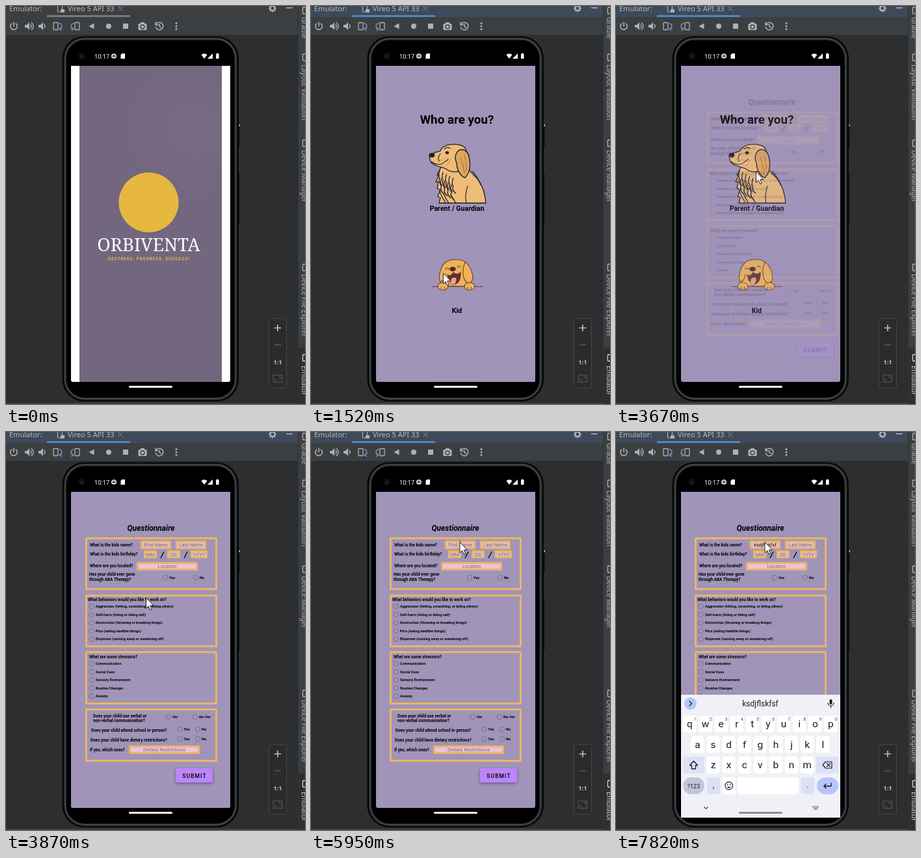
An HTML page with a canvas for the animation above (8000 ms loop, 460 by 612 pixels).

```html
<!DOCTYPE html>
<html lang="en">
<head>
<meta charset="utf-8">
<title>Emulator walkthrough</title>
<style>
html, body { margin: 0; width: 100%; height: 100%; overflow: hidden; background: #2b2d2f; }
canvas { display: block; width: 460px; height: 612px; }
</style>
</head>
<body>
<canvas id="stage" width="460" height="612"></canvas>
<script>
const W = 460, H = 612, LOOP = 8000;
const LILAC = '#a094b9', GOLD = '#ebb662', ICON = '#afb1b3', DIM = '#585b5d';
const ROBOTO = 'Roboto, sans-serif', NOTO = '"Noto Sans", sans-serif';
const TYPED = 'ksdjflskfsf';
const main = document.getElementById('stage').getContext('2d');
let c = main;

// Drawing helpers, all working on the current context
function text(s, x, y, font, color = '#000', align = 'left', spacing = 0) {
  c.font = font;
  c.fillStyle = color;
  c.textAlign = align;
  c.letterSpacing = spacing + 'px';
  c.fillText(s, x, y);
}
function rect(x, y, w, h, color) {
  c.fillStyle = color;
  c.fillRect(x, y, w, h);
}
function round(x, y, w, h, r, fill, stroke, lw = 1) {
  c.beginPath();
  c.roundRect(x, y, w, h, r);
  paint(fill, stroke, lw);
}
function paint(fill, stroke, lw = 1) {
  if (fill) { c.fillStyle = fill; c.fill(); }
  if (stroke) { c.strokeStyle = stroke; c.lineWidth = lw; c.stroke(); }
}
function disc(x, y, r, fill, stroke, lw = 1) {
  oval(x, y, r, r, fill, stroke, lw);
}
function oval(x, y, rx, ry, fill, stroke, lw = 1) {
  c.beginPath();
  c.ellipse(x, y, rx, ry, 0, 0, 7);
  paint(fill, stroke, lw);
}
function path(d, fill, stroke, lw = 1) {
  const p = new Path2D(d);
  if (fill) { c.fillStyle = fill; c.fill(p); }
  if (stroke) { c.strokeStyle = stroke; c.lineWidth = lw; c.stroke(p); }
}
function clipped(draw, h, r) {
  c.save();
  c.beginPath();
  c.roundRect(100, 92, 245, h, [0, 0, r, r]);
  c.clip();
  draw();
  c.restore();
}
function layer(draw) {
  const cv = document.createElement('canvas');
  cv.width = W;
  cv.height = H;
  c = cv.getContext('2d');
  c.lineJoin = c.lineCap = 'round';
  draw();
  c = main;
  return cv;
}

// App pages
function splash() {
  rect(0, 0, W, H, '#fff');
  rect(113, 92, 219, 486, '#72677f');
  const glow = c.createRadialGradient(290, 190, 10, 290, 190, 110);
  glow.addColorStop(0, 'rgba(130,116,142,.3)');
  glow.addColorStop(1, 'rgba(130,116,142,0)');
  rect(113, 92, 219, 300, glow);
  disc(219.5, 302, 46, '#e6b840');
  text('ORBIVENTA', 219.5, 377, '500 27.6px "Noto Serif", serif', '#fff', 'center');
  text('DESTRESS, PROGRESS, SUCCESS!', 220, 390.7, 'bold 5.8px Inter, sans-serif', '#edc04a', 'center', 1);
}

function bigDog() {
  const ink = '#1f1d2e', fur = '#edbd78';
  // Body with a ragged chest, then head, muzzle and ear
  path('M199 246L192 260L195 260L190 270L194 271L192 280L197 283L193 293L197 295L195 303H267C266 290 263 278 255 267C250 261 244 257 240 250Z', fur, ink, 1.3);
  path('M205 215C211 212 226 211 234 217C239 223 239 234 237 246C229 256 215 258 205 250C199 247 191 247 186 243C181 241 181 236 180 231C183 226 190 225 197 223C198 219 201 217 205 215Z', fur, ink, 1.3);
  path('M222 226C227 218 237 219 241 231C244 244 243 256 235 264C226 261 222 249 222 241C219 235 219 231 222 226Z', '#dfa55b', ink, 1.4);
  path('M183 239C189 244 199 246 204 239M203 220C206 217 209 217 212 219M197 227C194 231 193 235 195 239M204 239c3 0 4-2 5-4', null, ink, 1.1);
  oval(184, 229.5, 4.4, 3.4, ink);
  oval(207.5, 225.5, 2.8, 2.3, ink);
  for (let i = 0; i < 9; i++) {
    const x = 196 + i * 2.6, y = 253 + (i * 13) % 23;
    path(`M${x} ${y}q-3 8 0 12l-1 3q1 5 5 8`, null, ink, 1.3);
  }
  path('M196 284c2 7 5 13 9 18M202 288c2 6 5 11 8 15M213 290c3 5 5 9 8 13', null, ink, 1.2);
  path('M239 277c-3 9-4 18-2 26M246 254c5 5 10 12 13 21', null, ink, 1.1);
  path('M228 232c3 9 5 17 6 26M234 229c2 8 3 15 3 24', null, '#9c6a38', 0.9);
  path('M190 234c4 3 8 4 12 2M212 236c-1 5-3 8-7 10', null, '#bb8547', 0.9);
}

function smallDog() {
  const ink = '#6b3f33', fur = '#edb25a';
  path('M184 431.5H262', null, ink, 1);
  path('M198 431C195 420 197 402 204 395C211 389 226 388 234 393C241 398 244 410 243 431Z', fur, ink, 1.1);
  path('M203 396C198 401 194 414 196 422C199 426 204 421 205 413', fur, ink, 1.1);
  path('M235 394C243 398 249 415 246 422C242 429 236 426 233 418C231 410 231 403 235 394Z', fur, ink, 1.1);
  path('M208 413C211 416 215 414 217 409C220 413 225 413 228 409C229 418 226 427 219 428C212 427 209 421 208 413Z', '#5b2e2c', ink, 0.8);
  path('M214 419C218 416 222 417 222 421C221 426 219 430 215 429C212 428 212 422 214 419Z', '#e9a09c', ink, 0.7);
  oval(216, 404.5, 4.8, 3.4, '#4c2826');
  path('M205 405c1-3 4-3 5 0M223 402c1-3 4-3 5 0', null, ink, 1.1);
  for (const x of [201, 242]) {
    oval(x, 431, 8, 5.8, fur, ink, 1.1);
    path(`M${x - 2.5} 432v4M${x + 2.5} 432v4`, null, ink, 0.8);
  }
}

function chooser() {
  rect(0, 0, W, H, LILAC);
  text('Who are you?', 222.5, 181, 'bold 18.8px ' + ROBOTO, '#000', 'center');
  bigDog();
  text('Parent / Guardian', 222.5, 315, 'bold 10.6px ' + ROBOTO, '#000', 'center');
  smallDog();
  text('Kid', 222.5, 472, 'bold 10.6px ' + ROBOTO, '#000', 'center');
}

function label(s, x, mid) { text(s, x, mid + 2.3, 'bold 6.35px ' + ROBOTO); }
function radio(x, y, s, gap = 6) {
  disc(x, y, 3.7, null, '#756b8b', 0.9);
  text(s, x + gap, y + 2.1, 'bold 5.55px ' + ROBOTO);
}
function field(x, y, w, h, hint, fill = '#e2bfd0') {
  round(x, y, w, h, 0, GOLD);
  rect(x + 3, y + 3, w - 6, h - 6, fill);
  if (hint) text(hint, x + w / 2, y + h / 2 + 2.6, '7.5px ' + ROBOTO, '#766383', 'center');
}

function form() {
  rect(0, 0, W, H, LILAC);
  text('Questionnaire', 222, 152, 'italic bold 12px ' + ROBOTO, '#000', 'center');
  for (const [y, h] of [[162, 81], [250, 81], [337, 82], [425, 82]]) {
    c.strokeStyle = GOLD;
    c.lineWidth = 3;
    c.strokeRect(122.5, y + 1.5, 200, h - 3);
  }
  label('What is the kids name?', 128, 173.5);
  field(206, 167, 47, 13, 'First Name');
  field(260, 167, 47, 13, 'Last Name');
  label('What is the kids birthday?', 128, 188);
  field(211, 182, 20, 12, 'MM');
  field(247, 182, 20, 12, 'DD');
  field(283, 182, 26, 12, 'YYYY');
  for (const x of [239.5, 275.5]) text('/', x, 193, 'italic bold 13px ' + ROBOTO, '#000', 'center');
  label('Where are you located?', 128, 206);
  field(200, 200, 94, 13, 'Location', '#edc2dc');
  label('Has your child ever gone', 127, 218.5);
  label('through ABA Therapy?', 127, 226.5);
  radio(244, 224, 'Yes');
  radio(291, 224, 'No');

  label('What behaviors would you like to work on?', 125, 258);
  ['Aggression (hitting, scratching, or biting others)', 'Self-harm (hiting or biting self)',
    'Destruction (throwing or breaking things)', 'Pica (eating inedible things)',
    'Elopment (running away or wandering off)'
  ].forEach((s, i) => radio(130.5, 268.3 + i * 12.5, s, 6.5));

  label('What are some stressors?', 127, 345.5);
  ['Communication', 'Social Cues', 'Sensory Environment', 'Routine Changes', 'Anxiety']
    .forEach((s, i) => radio(130.5, 356 + i * 12.5, s, 6.5));

  label('Does your child use verbal or', 133, 436.7);
  label('non-verbal communication?', 133, 444);
  radio(249, 438, 'Ver');
  radio(290, 438, 'No-Ver');
  label('Does your child attend school in-person?', 130, 459);
  label('Does your child have dietary restrictions?', 129, 474);
  for (const y of [457, 472]) {
    radio(266.5, y, 'Yes');
    radio(294, y, 'No');
  }
  label('If yes, which ones?', 128, 489);
  field(188, 482, 109, 13, 'Dietary Restrictions', '#edc2dc');

  c.shadowColor = 'rgba(0,0,0,.4)';
  c.shadowBlur = 4;
  c.shadowOffsetY = 1.5;
  round(260, 517, 57, 22, 2, '#bb86fc');
  c.shadowColor = 'transparent';
  text('SUBMIT', 289, 531.5, '500 8.6px ' + ROBOTO, '#000', 'center', 1);
}

function keyboard() {
  const soft = '#dde1f7', blue = '#b4c6fc', ink = '#1c1b20';
  const key = (s, x, y) => {
    round(x - 10.2, y - 13, 20.4, 26, 3.5, '#fff');
    text(s, x, y + 5, '15.5px ' + ROBOTO, ink, 'center');
  };
  rect(100, 404, 245, 189, '#f1f0f7');
  disc(114.5, 417.5, 9.5, blue);
  path('M113 414l3.5 3.5l-3.5 3.5', null, ink, 1.3);
  round(328.5, 411, 4, 8, 2, ink);
  path('M326 416.5a4.5 4.5 0 0 0 9 0M330.5 421v3', null, ink, 1.2);
  [...'qwertyuiop'].forEach((s, i) => {
    key(s, 113.5 + i * 24.1, 449);
    text((i + 1) % 10, 121.5 + i * 24.1, 443.5, '6.5px ' + ROBOTO, '#47464f', 'center');
  });
  [...'asdfghjkl'].forEach((s, i) => key(s, 125.5 + i * 24.1, 480.5));
  [...'zxcvbnm'].forEach((s, i) => key(s, 149.5 + i * 24.1, 512));
  round(103, 499, 33, 26, 3.5, soft);
  path('M119.5 506l6 6.5h-3v5.5h-6v-5.5h-3z', null, ink, 1.3);
  round(308, 499, 34, 26, 3.5, soft);
  path('M318 512l4.5-5h9.5v10h-9.5zM324.5 509.5l5 5M329.5 509.5l-5 5', null, ink, 1.2);

  round(103, 531, 33, 26, 13, '#c2c5dc');
  text('?123', 119.5, 547.5, '9px ' + ROBOTO, ink, 'center');
  round(139.5, 531, 20.5, 26, 3.5, soft);
  text(',', 150, 547, '13px ' + ROBOTO, ink, 'center');
  round(163.5, 531, 20.5, 26, 3.5, '#fff');
  disc(173.7, 544, 5.8, null, ink, 1.2);
  disc(171.7, 542.3, 0.9, ink);
  disc(175.7, 542.3, 0.9, ink);
  path('M170.8 545.6a3.2 3.2 0 0 0 5.8 0z', ink);
  round(187, 531, 94, 26, 3.5, '#fff');
  round(284.5, 531, 20.5, 26, 3.5, soft);
  text('.', 295, 547, '13px ' + ROBOTO, ink, 'center');
  round(309, 531, 33, 26, 13, blue);
  path('M331 540v4.5h-11M323 541.3l-3.2 3.2l3.2 3.2', null, ink, 1.3);
  path('M135.5 576.5l3 3l3-3', null, '#4a4952', 1.1);
  for (let i = 0; i < 10; i++) rect(302.5 + (i % 5) * 2, 575 + (i > 4) * 2, 1.2, 1.2, '#4a4952');
  rect(304.5, 579.2, 5.2, 1.2, '#4a4952');
}

// IDE window and phone body
function sideTab(s, y, iconY, color = '#b4b6b8') {
  round(456.5, iconY - 5, 8, 10, 1, null, color, 1.3);
  c.save();
  c.translate(454.5, y);
  c.rotate(Math.PI / 2);
  text(s, 0, 0, '10.6px ' + NOTO, color);
  c.restore();
}

function toolbar() {
  const y = 31, blue = '#6f93c8';
  path('M12 25v6M8.6 27.2a5.2 5.2 0 1 0 6.8 0', null, ICON, 1.6);
  for (const x of [35, 56]) {
    path(`M${x - 6} 29h3l4-4v12l-4-4h-3z`, ICON);
    path(`M${x + 3} 28.5a3.5 3.5 0 0 1 0 5`, null, ICON, 1.4);
  }
  path('M39 25.5a6.5 6.5 0 0 1 0 11', null, ICON, 1.3);
  round(73, 25.5, 7, 11, 1, null, ICON, 1.3);
  path('M82 26.5c5 1 5 8 1 9M85 33l-3 2.5l3 2', null, blue, 1.4);
  round(106, 25.5, 7, 11, 1, null, ICON, 1.3);
  path('M104 26.5c-5 1-5 8-1 9M101 33l3 2.5l-3 2', null, blue, 1.4);
  path('M127.5 31l8-4.5v9z', ICON);
  disc(158, y, 4, ICON);
  rect(180, 27, 8, 8, ICON);
  round(203.5, 27, 13, 10, 1.5, ICON);
  rect(207, 25, 6, 3, ICON);
  disc(210, 32, 3, null, '#3c3f41', 1.3);
  path('M231 28a5.8 5.8 0 1 1-.6 4.5M230 25v4h4M236 28v3.5l2.5 1.5', null, ICON, 1.5);
  for (const d of [-4.5, 0, 4.5]) disc(262, y + d, 1.5, ICON);
}

function zoomPanel() {
  round(404.5, 480.5, 27, 107, 3, '#292b2c', '#434547');
  path('M413.5 495h9M418 490.5v9', null, '#bcbec0', 1.7);
  path('M413.5 521h9', null, DIM, 1.5);
  text('1:1', 418, 550.5, 'bold 9.6px ' + NOTO, '#bcbec0', 'center');
  c.strokeStyle = DIM;
  c.lineWidth = 1;
  c.strokeRect(411.5, 567.5, 13, 11);
  path('M414 573.5v2.5h2.5M419.5 570h2.5v2.5', null, DIM, 1);
}

function phone() {
  rect(357, 182, 3, 35, '#161718');
  rect(358.5, 182, 1.5, 3, '#c0c0c0');
  rect(357, 258, 2.5, 78, '#161718');
  // Dark shell, soft metal rim, black glass
  round(86.5, 46.5, 271.5, 561.5, 34, '#050506');
  round(91, 50.5, 262.5, 553.5, 30, '#000', '#1d1e1f', 4.5);
  round(91, 50.5, 262.5, 553.5, 30, null, '#46484a', 1.8);
  disc(116.5, 77, 5.5, '#0d0e10');
  disc(116.5, 77, 1.6, '#2b3140');
  text('10:17', 136, 80.5, '9.3px ' + ROBOTO, '#fff');
  disc(166, 77, 3.2, null, '#fff', 1.2);
  path('M162.5 76h7M162.5 78.5h7', null, '#fff', 1);
  path('M178.5 73h4.5v8h-6.5v-6z', '#fff');
  path('M300.5 75a7 7 0 0 1 9 0l-4.5 6z', '#fff');
  path('M318 73v8h-8z', '#fff');
  round(323, 73.5, 4.6, 7.5, 0.8, '#fff');
  rect(324.3, 72.5, 2, 1.5, '#fff');
}

function desk(focused) {
  rect(0, 0, W, H, '#2c2e30');
  rect(0, 0, 449, 17, focused ? '#3e4a59' : '#3c3f41');
  rect(0, 17, 449, 27, '#3c3f41');
  rect(0, 44, 449, 1, '#323435');
  text('Emulator:', 5, 8, '11px ' + NOTO, '#bbb');
  text('Vireo 5 API 33', 95, 8, '11px ' + NOTO, '#bbb');
  round(79.5, -2, 7, 11, 1, null, ICON, 1.2);
  rect(84, 5, 6, 5, ICON);
  path('M173 1l6 6M179 1l-6 6', null, '#75797c', 1.1);
  rect(63, 14, 128, 3, focused ? '#4a88c7' : '#747a80');
  disc(410, 3.5, 3.6, null, ICON, 2.4);
  for (let i = 0; i < 8; i++) {
    const a = i * Math.PI / 4;
    disc(410 + 5 * Math.cos(a), 3.5 + 5 * Math.sin(a), 1.1, ICON);
  }
  rect(431, 2, 10, 1.6, ICON);
  toolbar();
  rect(449, 0, 11, H, '#3c3f41');
  rect(449, 525, 11, 87, '#2d2f31');
  rect(449, 0, 1, H, '#303234');
  sideTab('Gradle', 17, 7);
  sideTab('Layout Validation', 90, 79);
  sideTab('Device Manager', 221.5, 211);
  sideTab('Device File Explorer', 412, 402);
  sideTab('Emulator', 553, 541, '#d5d7d9');
  rect(0, 610, 449, 2, '#3c3f41');
  zoomPanel();
  phone();
}

const pages = [splash, chooser, form].map(layer);
const desks = [false, true].map(f => layer(() => desk(f)));
const keys = layer(keyboard);

// Timing
const clamp = v => Math.max(0, Math.min(1, v));
const between = (t, a, b) => t >= a && t < b;
// Number of the current step when n changes fall evenly from a to b
const stepAt = (t, a, b, n) => Math.min(n - 1, Math.floor((t - a) / (b - a) * (n - 1) + 0.05));

function cubic(p0, p1, p2, p3, u) {
  const v = 1 - u;
  return v * v * v * p0 + 3 * v * v * u * p1 + 3 * v * u * u * p2 + u * u * u * p3;
}
// Two-part curve: quick start, very slow finish
function slideEase(x) {
  if (x <= 0 || x >= 1) return clamp(x);
  const [xs, ys] = x < 1 / 6
    ? [[0, 0.05, 0.1333, 1 / 6], [0, 0, 0.06, 0.4]]
    : [[1 / 6, 0.2083, 0.25, 1], [0.4, 0.82, 1, 1]];
  let lo = 0, hi = 1;
  for (let i = 0; i < 24; i++) {
    const m = (lo + hi) / 2;
    if (cubic(...xs, m) < x) lo = m; else hi = m;
  }
  return cubic(...ys, lo);
}

const moves = [
  { a: 180, b: 450, n: 5, pts: [315, 557, 245, 460, 203, 410] },
  { a: 2180, b: 2660, n: 8, pts: [203, 390, 240, 300, 215, 254] },
  { a: 4870, b: 5420, n: 8, pts: [223, 214, 226, 185, 228.5, 168.5] }
];
const swaps = [
  { a: 1380, b: 1720, n: 6, start: 1313, to: 1 },
  { a: 3600, b: 4010, n: 7, start: 3603, to: 2 }
];
const presses = [[780, 1050], [2990, 3400], [5620, 5820]];

function pointer(t) {
  const m = moves.filter(m => t >= m.a).pop();
  if (!m) return null;
  const k = stepAt(t, m.a, m.b, m.n) / (m.n - 1);
  const [x0, y0, x1, y1, x2, y2] = m.pts;
  const q = (p, r, s) => (1 - k) * (1 - k) * p + 2 * k * (1 - k) * r + k * k * s;
  return [q(x0, x1, x2), q(y0, y1, y2)];
}

function drawPages(t) {
  const s = swaps.filter(s => t >= s.a).pop();
  if (!s) return c.drawImage(pages[0], 0, 0);
  const k = stepAt(t, s.a, s.b, s.n);
  if (k === s.n - 1) return c.drawImage(pages[s.to], 0, 0);
  const age = s.a + k * (s.b - s.a) / (s.n - 1) - s.start;
  const p = slideEase(age / 450);
  c.drawImage(pages[s.to - 1], Math.round(-24.5 * p), 0);
  c.globalAlpha = clamp((age - 50) / 83);
  c.drawImage(pages[s.to], Math.round(24.5 * (1 - p)), 0);
  c.globalAlpha = 1;
}

function drawTyping(t) {
  if (between(t, 5950, 6410)) rect(229, 167, 1, 12, '#4b3a6b');
  if (t < 6870) return;
  const k = stepAt(t, 6870, 7290, 7);
  const s = TYPED.slice(0, Math.ceil(TYPED.length * (k + 1) / 7));
  field(206, 167, 47, 13);
  text(s, 229.5, 176, '7.5px ' + ROBOTO, '#111', 'center');
  const drop = Math.round(189 * Math.pow(1 - (k + 1) / 7, 2.2));
  c.drawImage(keys, 0, drop);
  text(s, 222, 422 + drop, '12px ' + ROBOTO, '#1c1b20', 'center');
}

function drawPointer(t) {
  const p = pointer(t);
  if (!p) return;
  c.save();
  c.translate(...p);
  if (presses.some(([a, b]) => between(t, a, b))) disc(0, 0, 12, 'rgba(255,255,0,.47)');
  path('M.5 .8V17.3L4.2 13.8L6.7 19.6L9.1 18.6L6.8 12.8H11.9Z', '#fff', '#111', 0.9);
  c.restore();
}

function render(t) {
  c.drawImage(desks[t >= 850 ? 1 : 0], 0, 0);
  clipped(() => drawPages(t), 486, 3);
  clipped(() => drawTyping(t), 501, 0);
  const pill = t < 7550 ? '#fff' : t < 7820 ? '#c4c3c9' : '#8d8c92';
  round(189, 584, 67, 3, 1.5, pill);
  drawPointer(t);
}

const begin = performance.now();
function tick() {
  render((performance.now() - begin) % LOOP);
  requestAnimationFrame(tick);
}
tick();
</script>
</body>
</html>
```
